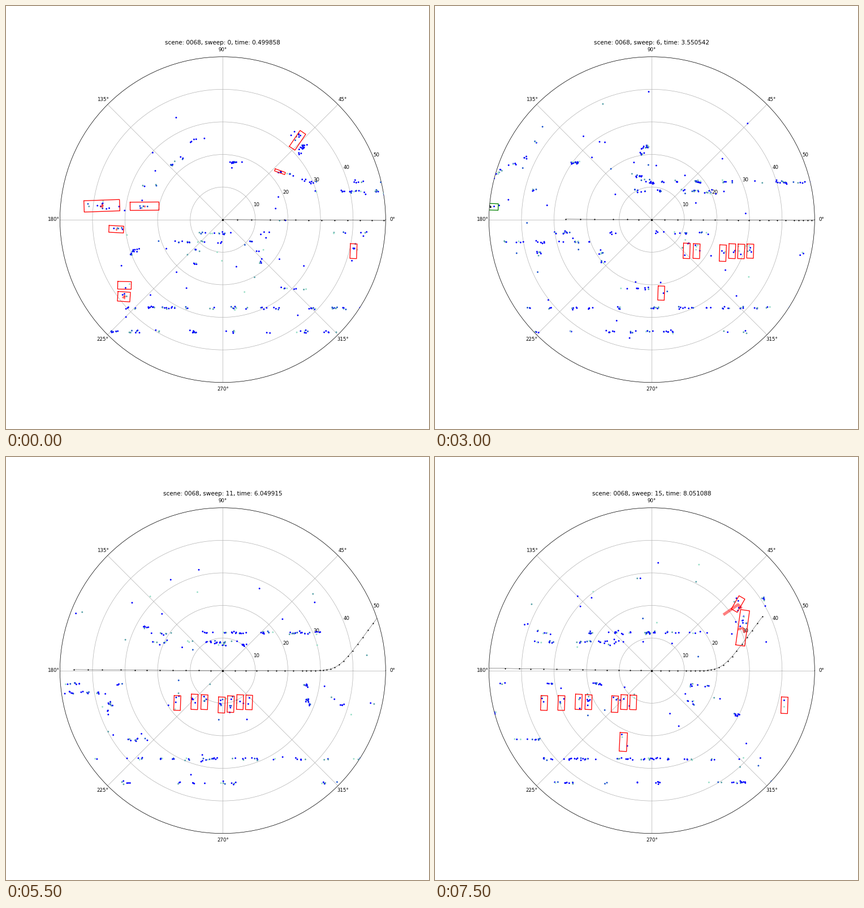
These frames come from a looping animation (748x748 px, 8 s). A matplotlib script:

```python
import numpy as np
import matplotlib.pyplot as plt
from matplotlib.animation import FuncAnimation

SIZE, STEP = 748, 500
CX, CY, UNIT = 383.35, 377.74, 5.76  # stage centre, pixels per metre
PT = 72 * 12 / SIZE                  # one pixel in points

TIMES = [0.499858, 0.999937, 1.500163, 2.149872, 2.65032, 3.050268, 3.550542,
         4.050116, 4.549904, 5.052392, 5.550187, 6.049915, 6.550203, 7.054284,
         7.549862, 8.051088]
FRAMES = len(TIMES)

# distance driven at each sweep, past the last shown one to the end of the route
clock = np.append(TIMES, TIMES[-1] + .5 * np.arange(1, 22)) - TIMES[0]
EGO = np.interp(clock, [0, 2.55, 4.55, 6.05, 7.55, 9.55, 11.55, 13.05, 15.55, 18.05],
                [0, 129, 221, 285, 343, 404, 435, 454, 493, 539])
RISE = 13.6 * np.log1p(np.exp((EGO - 468) / 10))  # the left turn

# parked cars: x along the road, y, height, first and last sweep, sweeps missed
PARKED = [(520, 435, 26, 2, 10, range(3, 8)), (536, 435, 26, 9, 15, range(11, 14)),
          (566.5, 435, 26, 4, 15, (6, 7)), (597, 433, 27, 6, 15, range(8, 11)),
          (614.5, 433.5, 26, 0, 15, (2,)), (645, 438.5, 28, 4, 13, (6,)),
          (661, 437, 29, 6, 15, ()), (677.5, 433.5, 26, 2, 15, ()),
          (693.5, 434, 25.5, 4, 15, (12, 13)), (709.5, 433.5, 25, 6, 10, ()),
          (961, 439, 29, 13, 15, ())]

# other vehicles: last sweep, x, y, drift, width, height, angle, mark
VEHICLES = [(3, 169.5, 353.3, -1, 63, 20, 2, "burst"),
            (5, 245, 354, -.7, 51, 14.5, .5, "pin"),
            (3, 195, 394.7, .2, 26, 12, -3, "pin"),
            (3, 209.5, 494, 0, 24, 13.5, -1, ""),
            (1, 208.5, 514, 0, 22, 17, -4, "burst"),
            (1, 515.5, 237.5, 0, 34, 12, 56, ""),
            (1, 484.5, 293, 0, 19, 4, -20, "")]

# reflecting rows along the road: x from, x to, y, clumps
ROWS = [(130, 1010, 534, 84), (180, 1000, 576, 60), (278, 640, 401, 20),
        (246, 440, 417, 18), (530, 825, 311, 38), (495, 680, 327, 24),
        (388, 430, 277, 7), (460, 530, 500, 7), (795, 830, 404, 5)]
# slanted walls: start, end, clumps
WALLS = [(192, 317, 193, 297, 3), (230, 324, 266, 315, 5), (252, 308, 267, 287, 5),
         (289, 282, 313, 268, 6), (328, 243, 341, 231, 5), (314, 321, 350, 332, 5),
         (232, 428, 210, 452, 5), (335, 424, 335, 458, 5), (446, 424, 449, 460, 5),
         (499, 296, 541, 314, 7), (516, 266, 532, 238, 7), (600, 330, 690, 333, 6),
         (795, 428, 800, 440, 6), (840, 424, 885, 462, 8), (922, 250, 938, 290, 8)]

scatter = np.random.default_rng(68)
CLUMPS = np.concatenate([
    np.array([x0, y0]) + scatter.random((n, 1)) * np.array([x1 - x0, y1 - y0])
    for x0, y0, x1, y1, n in [(a, y, b, y, n) for a, b, y, n in ROWS] + WALLS])

SHADES = np.array([(0, 0, 1), (.1, .33, .8), (.35, .63, .66), (.6, .87, .78)])

fig = plt.figure(figsize=(12, 12), dpi=SIZE / 12)
ax = fig.add_subplot(projection="polar")
ax.set_ylim(0, 50)
ax.set_yticks([10, 20, 30, 40, 50])
ax.set_axisbelow(True)
live = []


def polar(x, y):
    dx, dy = np.asarray(x) - CX, CY - np.asarray(y)
    return np.arctan2(dy, dx), np.hypot(dx, dy) / UNIT


def line(x, y, *args, **kw):
    live.extend(ax.plot(*polar(x, y), *args, **kw))


def box(x, y, w, h, deg=0, color="red"):
    """Draw a turned box and return its centre and reach."""
    a = np.radians(deg)
    u = np.array([-1, 1, 1, -1, -1]) * w / 2
    v = np.array([-1, -1, 1, 1, -1]) * h / 2
    bx, by = x + u * np.cos(a) + v * np.sin(a), y - u * np.sin(a) + v * np.cos(a)
    line(bx, by, color=color, lw=1.5, zorder=4)
    return x, y, np.ptp(bx), np.ptp(by)


def pin(x, y, color="red"):
    line([x], [y], "s", ms=3 * PT, mfc="none", mec=color, mew=.6, zorder=5)


def arrow(*points, width=4):
    line(*zip(*points), color="red", alpha=.5, lw=width * PT, zorder=5,
         solid_capstyle="butt")


def burst(x, y):
    arrow((x, y - 4), (x, y + 4), width=3)
    arrow((x - 3, y + 2), (x + 3, y - 1), width=3)


def draw_path(n):
    dx = EGO - EGO[n]
    back = np.interp(n, [0, 6, 9, 13, 15], [.005, .006, .001, .013, .015])
    ahead = np.interp(n, [0, 6, 9, 15], [.005, .005, 0, .003])
    y = CY + dx * np.where(dx < 0, back, ahead) - RISE
    line(CX + dx, y, "k.-", lw=.45, ms=4.4 * PT, mew=0, zorder=3.5)
    line([CX], [CY], "ko", ms=3.4 * PT, mew=0, zorder=3.5)


def draw_boxes(n):
    d, boxes = EGO[n], []
    for x, y, h, first, last, missed in PARKED:
        if first <= n <= last and n not in missed:
            boxes.append(box(x - d, y, 11.7, h, -2))
    for last, x, y, drift, w, h, deg, mark in VEHICLES:
        if n <= last:
            x += drift * n - d
            boxes.append(box(x, y, w, h, deg))
            if mark:
                (pin if mark == "pin" else burst)(x, y)
    if n in (2, 9):
        pin(520 - d, 435)

    # oncoming car leaving to the left
    if 2 <= n <= 6:
        x = np.interp(n, [2, 4, 6], [199.5, 135, 98])
        y = np.interp(n, [2, 4, 6], [356.5, 353.5, 355])
        boxes.append(box(x, y, 27.5, 11.5, -2, "green"))
        pin(x, y, "black")
        if n > 2:
            line([x - 3, x, x - 1], [y - 1, y + 1, y - 2], "k", lw=2.4,
                 alpha=.6, zorder=5)

    # cars in the lower lane
    if 4 <= n <= 10:
        x = np.interp(n, [4, 6, 9, 10], [363, 400, 426, 434])
        boxes.append(box(x, 508.5 - .4 * (n - 4), 11.5, 25, -2))
        if n == 9:
            pin(x, 506)
    if n >= 12:
        k = n - 13
        boxes.append(box(259 + 37 * k, 508 - 2 * k, 11 + k, 26 + 3.5 * k, -3))

        # turning truck
        x, y = 583 - 19.5 * k, 288.5 + 6.8 * k
        boxes.append(box(x, y, 63, 16, 75.5 + 3.3 * k))
        arrow((x - 8, y + 3), (x, y), (x + 4, y + 9))
    if n == 15:
        boxes.append(box(536, 260, 27, 12, 60))
        arrow((510, 279), (536, 261), (542, 268), width=5)
    return boxes


def draw_echoes(n, boxes):
    rng = np.random.default_rng(100 + n)
    spots = CLUMPS - [EGO[n], 0]
    # walls straight abeam answer most often
    chance = .45 + .45 * np.exp(-((spots[:, 0] - CX - 5) / 35) ** 2)
    spots = spots[rng.random(len(spots)) < chance]
    spots = spots.repeat(rng.integers(1, 5, len(spots)), axis=0)
    pts = [spots + rng.normal(0, (3, 1.3), spots.shape)]
    for x, y, w, h in boxes:
        count = rng.integers(1, 6) + int(w * h / 200)
        pts.append(rng.normal((x, y - h * .2 * (h > w)), (w * .25, h * .2), (count, 2)))
    ang, rad = rng.uniform(0, 2 * np.pi, 34), rng.uniform(60, 284, 34)
    pts.append(np.c_[CX + rad * np.cos(ang), CY + rad * np.sin(ang) * .8])
    x, y = np.concatenate(pts).T
    shade = SHADES[rng.choice(4, len(x), p=[.62, .13, .14, .11])]
    live.append(ax.scatter(*polar(x, y), s=(2.9 * PT) ** 2, c=shade, lw=0, zorder=3))


def draw(n):
    while live:
        live.pop().remove()
    draw_path(n)
    draw_echoes(n, draw_boxes(n))
    ax.set_title(f"scene: 0068, sweep: {n}, time: {TIMES[n]}")
    ax.set_ylim(0, 50)
    return live


anim = FuncAnimation(fig, draw, frames=FRAMES, interval=STEP, repeat=True,
                     repeat_delay=0, init_func=lambda: [], blit=False)
plt.show()
```
